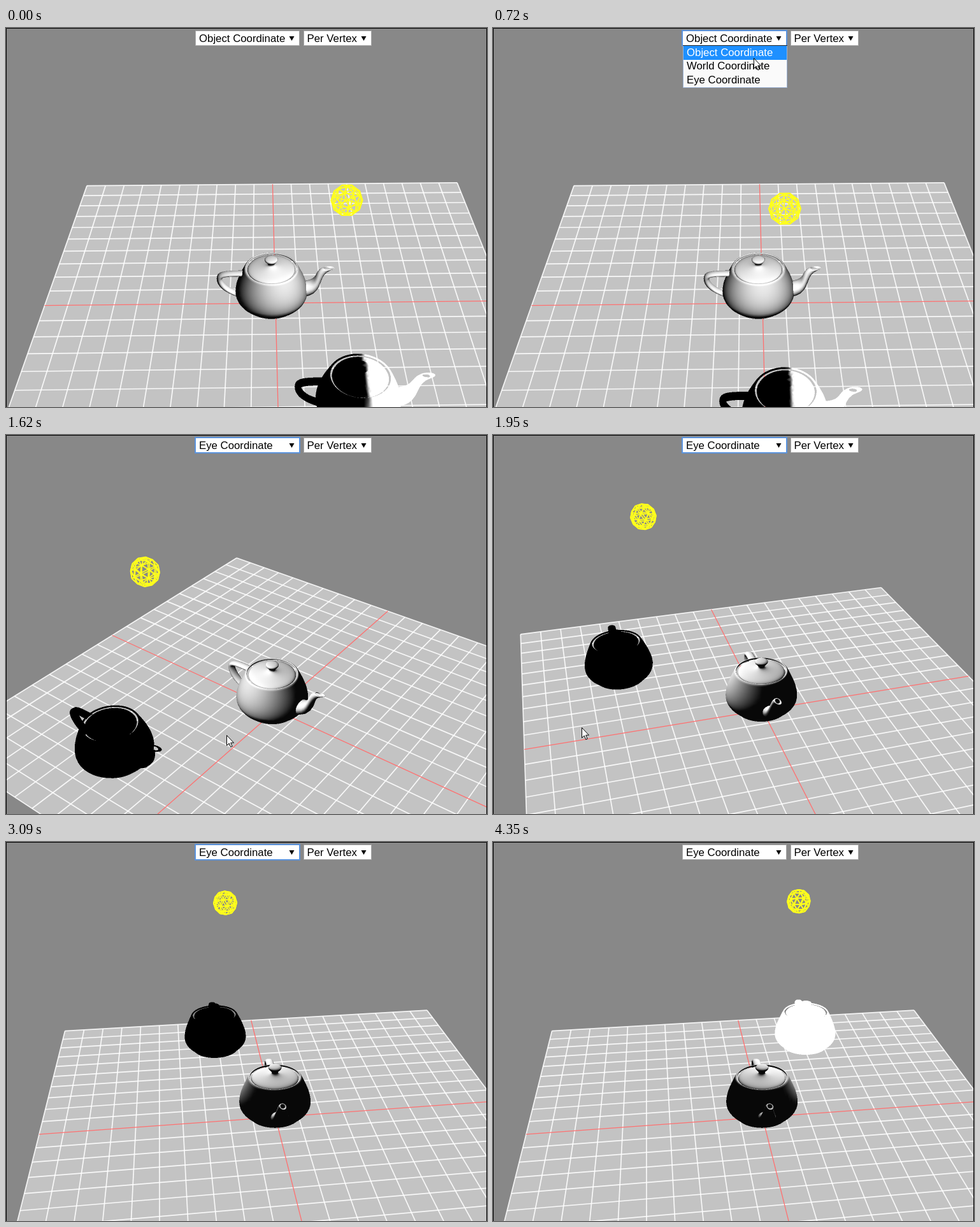
Write an HTML page with a canvas that moves like this. It is 755x595 px and loops after 4410 ms.

```html
<!DOCTYPE html>
<html lang="en">
<head>
<meta charset="utf-8">
<title>Teapot lighting</title>
<style>
  html, body { margin: 0; width: 755px; height: 595px; overflow: hidden; background: #888; }
  canvas, svg { position: absolute; left: 0; top: 0; display: block; }
  text { font: 16.8px "Liberation Sans", Arial, sans-serif; fill: #000; }
</style>
</head>
<body>
<canvas id="stage" width="755" height="595"></canvas>
<svg width="755" height="595" viewBox="0 0 755 595">
  <path d="M.5 595V.5H754.5V595" fill="none" stroke="#000"/>
  <g fill="#fff" stroke="#a9a9a9">
    <rect x="297.5" y="4.5" width="163" height="23"/>
    <rect x="467.5" y="4.5" width="106" height="23"/>
  </g>
  <rect id="focus" x="297" y="4" width="164" height="24" fill="none" stroke="#5b93dc" stroke-width="2"/>
  <text id="choice" x="303" y="22">Object Coordinate</text>
  <text x="472.5" y="22">Per Vertex</text>
  <path d="M444.5 13h8l-4 7zM557.5 13h8l-4 7z"/>
  <g id="list">
    <rect x="298.5" y="27.5" width="163" height="66" fill="#fafafa" stroke="#9db4d6"/>
    <rect x="299" y="28" width="162" height="22" fill="#1e90ff"/>
    <path d="M298 27.5H462" stroke="#222"/>
    <text x="304" y="44" style="fill:#fff">Object Coordinate</text>
    <text x="304" y="65">World Coordinate</text>
    <text x="304" y="87">Eye Coordinate</text>
  </g>
  <path id="cursor" d="M.5 .5V16.5L4.2 13L6.8 19L9.2 18L6.7 12.2H11.5Z" fill="#fff" stroke="#000"/>
</svg>
<script>
const LOOP = 4410, STEP = 30;
const CX = 423, CY = 432, DIST = 31.6, FOCAL = 36.1 * DIST;
const RAD = Math.PI / 180;

// key points: time, then values
const VIEW = [[1290, 0.9, 40], [1620, -35.8, 39.5], [1950, -73.85, 34.7], [2070, -82.3, 32.5]];
const ORBIT = [[0, -64], [720, -82.9], [1620, -116.8], [3090, -162.2], [4350, -205.9]];
const POINTER = [[90, 738, 330], [480, 409, 18], [720, 409, 47], [960, 385, 82],
  [1290, 571, 476], [1620, 346, 471], [1950, 139, 459], [2160, 140, 450], [2640, 752, 62]];
const OPEN = 510, PICK = 960, BLUR = 4200;

function sample(keys, t) {
  const i = keys.findIndex(k => t <= k[0]);
  if (i <= 0) return keys.at(i).slice(1);
  const a = keys[i - 1], b = keys[i], k = (t - a[0]) / (b[0] - a[0]);
  return a.slice(1).map((v, j) => v + (b[j + 1] - v) * k);
}

// ---- teapot mesh ----
const SIZE = 0.77, SHIFT = 0.225, EPS = 1e-3, ROUND = 48, STEPS = 9;
const verts = [], tris = [];

const ease = t => t * t * (3 - 2 * t);

function bez([a, b, c, d], t) {
  const s = 1 - t;
  return a.map((v, i) => s * s * s * v + 3 * s * s * t * b[i] + 3 * s * t * t * c[i] + t * t * t * d[i]);
}

function unit(v) {
  const l = Math.hypot(...v) || 1;
  return v.map(c => c / l);
}

// Each join leaves along the last tangent, scaled by pull, and ends at [handle, point].
function chain(first, ...joins) {
  const curves = [first];
  for (const [pull, handle, end] of joins) {
    const [, , c, d] = curves.at(-1);
    curves.push([d, d.map((v, i) => v + (v - c[i]) * pull), handle, end]);
  }
  return curves;
}

function sheet(nu, nv, at) {
  const base = verts.length;
  for (let i = 0; i <= nu; i++)
    for (let j = 0; j <= nv; j++) {
      const { p, n } = at(i / nu, j / nv);
      verts.push([(p[0] - SHIFT) * SIZE, p[1] * SIZE, p[2] * SIZE, ...unit(n)]);
    }
  for (let i = 0; i < nu; i++)
    for (let j = 0; j < nv; j++) {
      const a = base + i * (nv + 1) + j, b = a + nv + 1;
      tris.push([a, b, a + 1], [b, b + 1, a + 1]);
    }
}

function lathe(curves) {
  for (const curve of curves)
    sheet(STEPS, ROUND, (u, v) => {
      const [r, h] = bez(curve, u);
      const a = bez(curve, u - EPS), b = bez(curve, u + EPS);
      const dr = b[0] - a[0], dh = b[1] - a[1];
      const c = Math.cos(v * 2 * Math.PI), s = Math.sin(v * 2 * Math.PI);
      return { p: [r * c, h, r * s], n: [-dh * c, dr, -dh * s] };
    });
}

function tube(inner, outer, widths) {
  const diff = (a, b) => a.map((c, i) => c - b[i]);
  inner.forEach((curve, part) => {
    const pos = (u, v) => {
      const p = bez(curve, u), q = bez(outer[part], u);
      const t = v < 0.5 ? 2 * v : 2 - 2 * v, k = ease(t);
      const w = widths[part] + (widths[part + 1] - widths[part]) * ease(u);
      return [p[0] + (q[0] - p[0]) * k, p[1] + (q[1] - p[1]) * k, (v < 0.5 ? 3 : -3) * t * (1 - t) * w];
    };
    const normal = (u, v) => {
      const a = diff(pos(u + EPS, v), pos(u - EPS, v));
      const b = diff(pos(u, v + EPS), pos(u, v - EPS));
      return [a[1] * b[2] - a[2] * b[1], a[2] * b[0] - a[0] * b[2], a[0] * b[1] - a[1] * b[0]];
    };
    const sign = Math.sign(normal(0, 0.25)[2]);
    sheet(STEPS, 18, (u, v) => ({ p: pos(u, v), n: normal(u, v).map(c => c * sign) }));
  });
}

// body, lid, handle, spout
lathe(chain([[1.4, 2.4], [1.3375, 2.53], [1.4375, 2.53], [1.5, 2.4]],
  [4, [2, 1.35], [2, 0.9]], [1, [1.5, 0.225], [1.5, 0.15]], [1, [1.425, 0], [0, 0]]));
lathe(chain([[0, 3.15], [0.8, 3.15], [0, 2.85], [0.2, 2.7]], [1, [1.3, 2.55], [1.3, 2.4]]));
tube(chain([[-1.6, 2.025], [-2.3, 2.025], [-2.7, 2.025], [-2.7, 1.8]], [1, [-2.5, 1.125], [-2, 0.9]]),
     chain([[-1.5, 2.25], [-2.5, 2.25], [-3, 2.25], [-3, 1.8]], [1, [-2.65, 0.94], [-1.9, 0.6]]),
     [0.3, 0.3, 0.3]);
tube(chain([[1.7, 1.425], [2.6, 1.425], [2.3, 2.1], [2.7, 2.4]], [0.25, [2.9, 2.475], [2.8, 2.4]]),
     chain([[1.7, 0.6], [3.1, 0.825], [2.4, 2.025], [3.3, 2.4]], [0.25, [3.45, 2.51], [3.2, 2.4]]),
     [0.66, 0.25, 0.15]);

// ---- wire ball: an icosahedron with each edge split ----
const ball = [], wires = [];
const near = (a, b) => Math.hypot(...a.map((c, i) => c - b[i]));
const gold = (1 + Math.sqrt(5)) / 2;
for (const a of [-1, 1])
  for (const b of [-gold, gold]) ball.push([0, a, b], [a, b, 0], [b, 0, a]);
for (let i = 0; i < 12; i++)
  for (let j = 0; j < i; j++)
    if (near(ball[i], ball[j]) < 2.1) ball.push(ball[i].map((c, k) => c + ball[j][k]));
ball.forEach((p, i) => ball[i] = unit(p));
ball.forEach((p, i) => {
  for (let j = 0; j < i; j++) if (near(p, ball[j]) < 0.7) wires.push([i, j]);
});

// ---- camera ----
const cam = {};

function aim(yaw, tilt) {
  cam.cy = Math.cos(yaw * RAD);
  cam.sy = Math.sin(yaw * RAD);
  cam.ce = Math.cos(tilt * RAD);
  cam.se = Math.sin(tilt * RAD);
}

const turn = (x, z) => [x * cam.cy - z * cam.sy, x * cam.sy + z * cam.cy];

// takes a point already turned by the yaw
function project(x, y, z) {
  const s = 1 / (DIST + z * cam.ce - y * cam.se);
  return [CX + FOCAL * x * s, CY - FOCAL * (z * cam.se + y * cam.ce) * s, s];
}

function floorPoint(x, z) {
  const [a, b] = turn(x, z);
  return project(a, 0, b);
}

// ---- drawing ----
const $ = id => document.getElementById(id);
const ctx = $("stage").getContext("2d");
const PW = 260, PH = 180, SS = 2, BW = PW * SS, BH = PH * SS;
const pad = document.createElement("canvas");
pad.width = BW;
pad.height = BH;
const padCtx = pad.getContext("2d");
const image = padCtx.createImageData(BW, BH);
const pixels = new Uint32Array(image.data.buffer);
const depth = new Float32Array(BW * BH);
const clamp = (v, lo = 0, hi = 1) => Math.max(lo, Math.min(hi, v));

function fillTri(a, b, c) {
  const area = (b.x - a.x) * (c.y - a.y) - (c.x - a.x) * (b.y - a.y);
  if (!area) return;
  const x0 = Math.max(0, Math.floor(Math.min(a.x, b.x, c.x)));
  const x1 = Math.min(BW - 1, Math.ceil(Math.max(a.x, b.x, c.x)));
  const y0 = Math.max(0, Math.floor(Math.min(a.y, b.y, c.y)));
  const y1 = Math.min(BH - 1, Math.ceil(Math.max(a.y, b.y, c.y)));
  for (let y = y0; y <= y1; y++)
    for (let x = x0; x <= x1; x++) {
      const px = x + 0.5, py = y + 0.5;
      const wb = ((px - a.x) * (c.y - a.y) - (c.x - a.x) * (py - a.y)) / area;
      const wc = ((b.x - a.x) * (py - a.y) - (px - a.x) * (b.y - a.y)) / area;
      const wa = 1 - wb - wc;
      if (wa < 0 || wb < 0 || wc < 0) continue;
      const d = wa * a.d + wb * b.d + wc * c.d, i = y * BW + x;
      if (d <= depth[i]) continue;
      depth[i] = d;
      const g = Math.round(255 * (wa * a.v + wb * b.v + wc * c.v));
      pixels[i] = 0xff000000 | g << 16 | g << 8 | g;
    }
}

function drawPot({ x: ox, z: oz, shade }) {
  const [mx, my] = project(ox, 0, oz);
  const left = Math.round(mx) - PW / 2, top = Math.round(my) - 110;
  pixels.fill(0);
  depth.fill(0);
  const pts = verts.map(v => {
    const [rx, rz] = turn(v[0], v[2]), [nx, nz] = turn(v[3], v[5]);
    const p = [rx + ox, v[1], rz + oz], n = [nx, v[4], nz];
    const [sx, sy, d] = project(...p);
    const face = -n[0] * p[0] + n[1] * (DIST * cam.se - p[1]) + n[2] * (-DIST * cam.ce - p[2]);
    return { x: (sx - left) * SS, y: (sy - top) * SS, d, face, v: shade(p, n, v) };
  });
  for (const [i, j, k] of tris) {
    const a = pts[i], b = pts[j], c = pts[k];
    if (a.face + b.face + c.face > 0) fillTri(a, b, c);
  }
  padCtx.putImageData(image, 0, 0);
  ctx.drawImage(pad, left, top, PW, PH);
}

function line(a, b) {
  ctx.beginPath();
  ctx.moveTo(a[0], a[1]);
  ctx.lineTo(b[0], b[1]);
  ctx.stroke();
}

function drawFloor() {
  ctx.fillStyle = "#c3c3c3";
  ctx.beginPath();
  for (const [x, z] of [[-10, -10], [10, -10], [10, 10], [-10, 10]]) ctx.lineTo(...floorPoint(x, z).slice(0, 2));
  ctx.fill();
  ctx.strokeStyle = "rgba(255,255,255,.88)";
  ctx.lineWidth = 1.7;
  const cross = i => {
    line(floorPoint(i, -10), floorPoint(i, 10));
    line(floorPoint(-10, i), floorPoint(10, i));
  };
  for (let i = -10; i <= 10; i++) if (i) cross(i);
  ctx.strokeStyle = "#ff7070";
  ctx.lineWidth = 1.3;
  cross(0);
}

function drawBall(lx, ly, lz) {
  const pts = ball.map(p => {
    const [x, z] = turn(p[0], p[2]);
    return project(lx + x / 2, ly + p[1] / 2, lz + z / 2);
  });
  ctx.strokeStyle = "#ffff1c";
  ctx.lineWidth = 1.7;
  for (const [i, j] of wires) line(pts[i], pts[j]);
}

function show(id, on) {
  $(id).style.display = on ? "" : "none";
}

function render(t) {
  aim(...sample(VIEW, t));
  const a = sample(ORBIT, t)[0] * RAD;
  const [dx, dz] = turn(Math.cos(a), Math.sin(a));
  const light = [5 * dx, 8, 5 * dz];

  const lit = (p, n) => {
    const l = unit(light.map((c, i) => c - p[i]));
    const dot = Math.max(0, l[0] * n[0] + l[1] * n[1] + l[2] * n[2]);
    return clamp(0.03 + 1.04 * Math.pow(dot, 0.9));
  };
  // black or white by the sign of x, in object or eye space
  const split = (p, n, v) => clamp(0.5 + 9 * (t < PICK ? v[0] : p[0]));

  ctx.fillStyle = "#888";
  ctx.fillRect(0, 0, 755, 595);
  drawFloor();
  const pots = [{ x: 0, z: 0, shade: lit }, { x: 7 * dx, z: 7 * dz, shade: split }];
  pots.sort((p, q) => q.z - p.z).forEach(drawPot);
  drawBall(...light);

  show("focus", t >= OPEN && t < BLUR);
  show("list", t >= OPEN && t < PICK);
  $("choice").textContent = t < PICK ? "Object Coordinate" : "Eye Coordinate";
  show("cursor", t >= POINTER[0][0] && t < POINTER.at(-1)[0]);
  const [mx, my] = sample(POINTER, t);
  $("cursor").setAttribute("transform", `translate(${Math.round(mx)} ${Math.round(my)})`);
}

const start = performance.now();
let last = -1;
function tick() {
  const now = (performance.now() - start) % LOOP;
  const t = Math.min(4350, Math.floor(now / STEP) * STEP);
  if (t !== last) render(last = t);
  requestAnimationFrame(tick);
}
tick();
</script>
</body>
</html>
```
